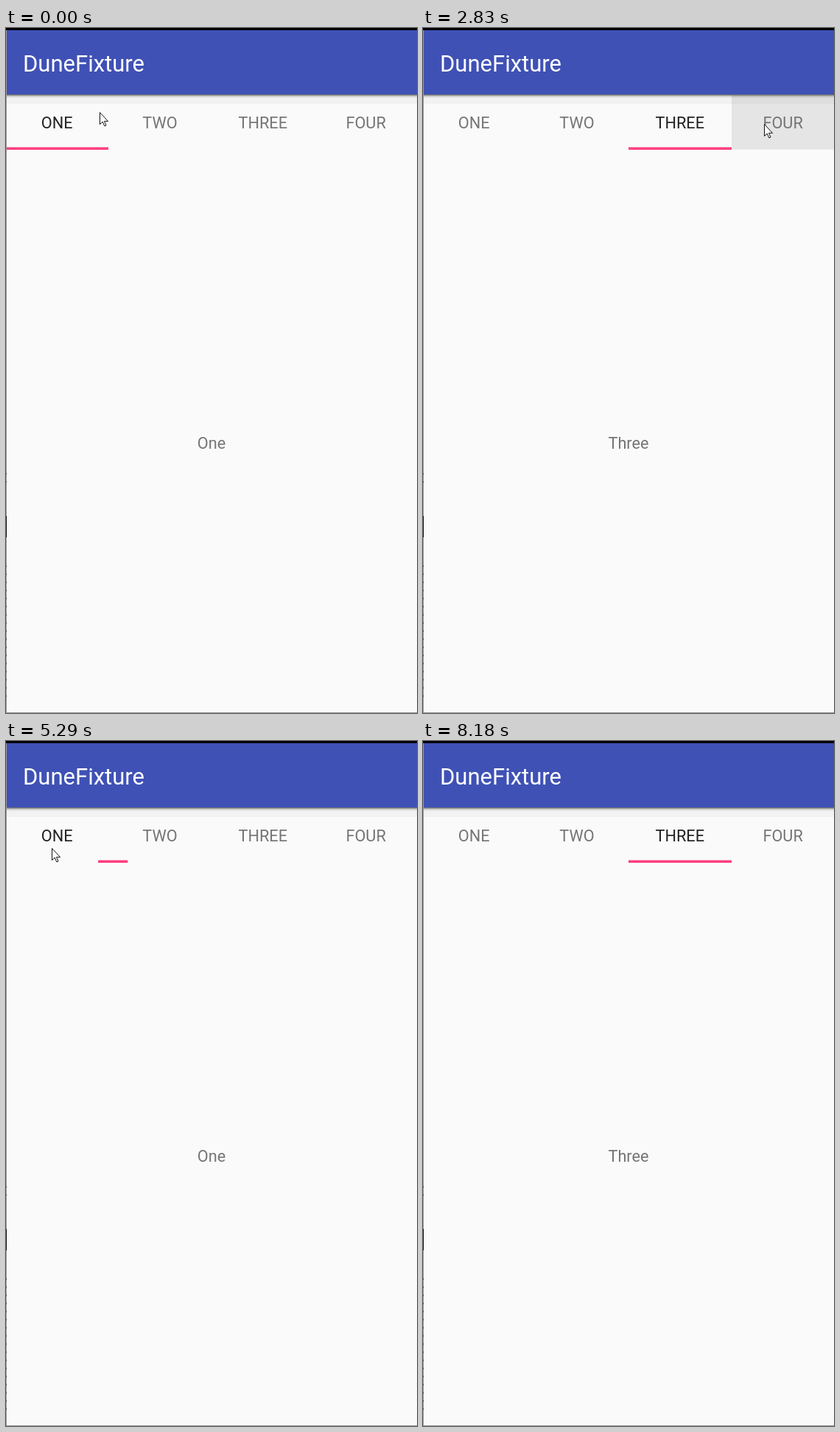
Recreate the animation shown at these times as an HTML page. Size 558 by 928 pixels, loop 9830 ms.

```html
<!DOCTYPE html>
<html lang="en">
<head>
<meta charset="utf-8">
<title>Tabs</title>
<style>
  html, body { margin: 0; height: 100%; overflow: hidden; background: #fafafa; }
  svg { display: block; width: 558px; height: 928px; }
  text { font: 21.7px Roboto, sans-serif; fill: #757575; text-anchor: middle; }
  .title { font-size: 31px; fill: #fff; text-anchor: start; }
  .on { fill: #212121; }
</style>
</head>
<body>
<svg viewBox="0 0 558 928">
  <defs>
    <linearGradient id="shade" x2="0" y2="1">
      <stop offset="0" stop-opacity=".6"/>
      <stop offset=".5" stop-opacity=".15"/>
      <stop offset="1" stop-opacity="0"/>
    </linearGradient>
  </defs>
  <rect width="558" height="928" fill="#fafafa"/>
  <rect y="90" width="558" height="13" fill="#f2f2f2"/>
  <rect id="press" y="91" height="73.5" opacity=".085"/>
  <rect y="90" width="558" height="5" fill="url(#shade)"/>
  <rect y="3" width="558" height="87" fill="#3f51b5"/>
  <rect width="558" height="3"/>
  <text class="title" x="23" y="59">DuneFixture</text>
  <g id="labels"></g>
  <rect id="bar" y="161.5" height="3.5" fill="#ff4081"/>
  <text id="page" x="279" y="570"></text>
  <path d="M.5 3V928M0 927.5H558" stroke="#999" fill="none"/>
  <path d="M.5 661V690" stroke="#111"/>
  <path d="M.5 603V618M.5 728V912" stroke="#555" stroke-dasharray="2 9"/>
  <path id="cursor" d="M.5.5V16.5L4.2 13 6.8 18.8 9 18 6.5 12.3H11.5Z" fill="#fff" stroke="#111"/>
</svg>
<script>
const $ = id => document.getElementById(id);
const LOOP = 9830, STEP = 135.5, LEAD = 39; // ms; the screen refreshes once per step
const SLIDE = 300 / STEP, OFFSET = 37, TAB = 139.8, GONE = 60;
const names = ['One', 'Two', 'Three', 'Four'];

// Pointer stops: step, x, y and, for a tap, the steps until its tab is selected
const stops = [
  [0, 127, 114], [3, 205, 140, .6], [7, 342, 150], [11, 372, 135],
  [15, 371, 135, 1.1], [21, 463, 130, .9], [26, 208, 140], [28, 208, 140, 0],
  [31, 440, 138], [33, 447, 137, .9], [37, 62, 145, 1.4], [39, 62, 145],
  [42, 377, 142], [44, 370, 142, 2.2], [46, 368, 150], [48, 448, 450],
  [50, 457, 494], [51, 457, 494], [53, 354, 520], [59, 531, 914]
];
const taps = stops.filter(s => s.length > 3);

const edge = i => Math.floor(i * TAB);
const mix = (a, b, k) => a + (b - a) * k;

const labels = names.map((name, i) => {
  const el = document.createElementNS('http://www.w3.org/2000/svg', 'text');
  el.textContent = name.toUpperCase();
  el.setAttribute('x', (i + .5) * TAB - .7);
  el.setAttribute('y', 136);
  return $('labels').appendChild(el);
});

// cubic-bezier(.4, 0, .2, 1)
function ease(x) {
  if (x >= 1) return 1;
  let lo = 0, hi = 1, s;
  for (let i = 0; i < 20; i++) {
    s = (lo + hi) / 2;
    const u = 1 - s;
    if (1.2 * u * u * s + .6 * u * s * s + s * s * s < x) lo = s; else hi = s;
  }
  return s * s * (3 - 2 * s);
}

function span(el, left, right) {
  left = Math.max(1, left);
  el.setAttribute('x', left);
  el.setAttribute('width', Math.max(0, right - left));
}

function drawTabs(n) {
  let tab = 0, from = 0, since = -SLIDE, pressed = -1;
  for (const [down, x, , delay] of taps) {
    const hit = Math.floor(x / TAB), pick = down + delay;
    if (n >= down && n < pick) pressed = hit;
    if (n >= pick) [from, tab, since] = [tab, hit, pick];
  }
  labels.forEach((el, i) => el.classList.toggle('on', i === tab));
  $('page').textContent = names[tab];
  span($('press'), edge(pressed), edge(pressed + 1));

  // A neighbour slides over; a longer jump grows from a point beside the tab
  let left = edge(from), right = edge(from + 1);
  if (tab - from > 1) left = right = edge(tab) - OFFSET;
  if (from - tab > 1) left = right = edge(tab + 1) + OFFSET;
  const k = ease((n - since) / SLIDE);
  span($('bar'), mix(left, edge(tab), k), mix(right, edge(tab + 1), k));
}

function drawCursor(n) {
  const i = stops.findIndex(s => s[0] > n);
  $('cursor').setAttribute('visibility', n < GONE ? 'visible' : 'hidden');
  const b = stops.at(i), a = i > 0 ? stops[i - 1] : b;
  const k = (n - a[0]) / (b[0] - a[0] || 1);
  const [x, y] = [1, 2].map(j => Math.round(mix(a[j], b[j], k)));
  $('cursor').setAttribute('transform', `translate(${x} ${y})`);
}

const start = performance.now();
function tick(now) {
  const n = Math.floor((Math.max(0, now - start) % LOOP + LEAD) / STEP);
  drawTabs(n);
  drawCursor(n);
  requestAnimationFrame(tick);
}
tick(start);
</script>
</body>
</html>
```
